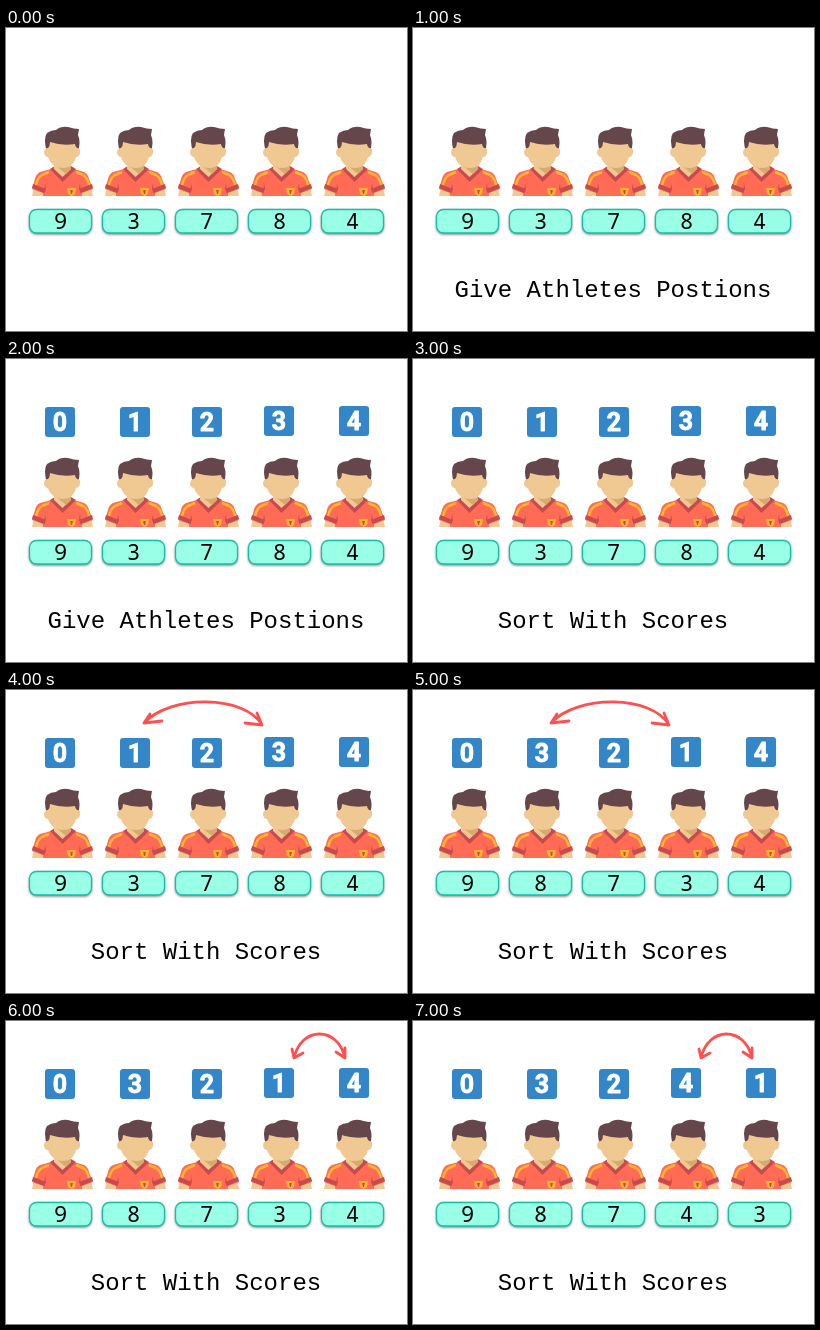
These frames come from a looping animation (401 by 303 pixels, 8 s). An HTML page:

```html
<!DOCTYPE html>
<html lang="en">
<head>
<meta charset="utf-8">
<style>
  html, body { margin: 0; width: 100%; height: 100%; overflow: hidden; background: #fff; }
  svg { display: block; width: 401px; height: 303px; }
  text { text-anchor: middle; }
  .title { font: 24px "Courier New", "Liberation Mono", monospace; }
  .score { font: 22px "Noto Sans Mono", monospace; }
  .rank { font: 700 25px Roboto, sans-serif; fill: #fff; stroke: #fff; stroke-width: .8; stroke-linejoin: round; }
  .box { fill: #99ffe6; stroke: #16c0a6; stroke-width: 1.3; filter: drop-shadow(0 1.5px 1.3px #0007); }
  .arrow { fill: none; stroke: #ff5050; stroke-width: 2.8; stroke-linecap: round; stroke-linejoin: round; }
</style>
</head>
<body>
<svg viewBox="0 0 401 303">
  <defs>
    <g id="athlete">
      <path fill="#f0c891" d="M2 60L13 63V69H0ZM59 60L48 63V69H61Z"/>
      <path fill="#ff6b55" d="M19 42L8 45Q4 47 3 52L0 62L11 66V69H50V66L61 62L57 52Q56 47 52 45L42 42Z"/>
      <path fill="none" stroke="#ffb62e" stroke-width="2.5" d="M17 45L10 48Q6 50 4 58M44 45L51 48Q55 50 57 58"/>
      <path fill="#c64b4e" d="M1 57L14 62L12 66L0 61ZM60 57L47 62L49 66L61 61ZM13 56L14 62L12 67ZM48 56L47 62L49 67Z"/>
      <path fill="#c64b4e" d="M18 42L30.5 55L44 42L39 39H23Z"/>
      <path fill="#f0c891" d="M22 36H39V42L30.5 50L22 42Z"/>
      <path fill="#d7aa70" d="M23 38H39V42L34 47Z"/>
      <path fill="#ffb62e" d="M35 61H44L43 67L40 69L36 67Z"/>
      <path fill="#c64b4e" d="M38 63H41L40 67H39Z"/>
      <path fill="#65464a" d="M15 26Q11 11 15 6Q19 3 24 3Q29 -1 36 0Q42 2 47 2L46 8Q49 15 46 25Z"/>
      <path fill="#f0c891" d="M16 21Q18 19 18 15Q30 19 43 17Q43 19 45 21Q49 21 48 26Q47 30 44 30Q42 37 37 40Q31 42 25 40Q18 37 16 30Q13 30 12 26Q12 21 16 21Z"/>
    </g>
  </defs>
  <g id="row"></g>
  <g class="arrow">
    <path id="wide" d="M138 33C165 4 239 5 256 35M144 24L138 33L156 31M251 23L256 35L239 33"/>
    <path id="narrow" d="M288 37C295 5 332 5 339 37M286 28L288 37L297 32M339 27L339 37L330 31"/>
  </g>
  <text id="title" class="title" x="200" y="269"></text>
</svg>
<script>
const byId = id => document.getElementById(id);
const badgeX = [54, 129, 201, 273, 348];
const scores = [9, 3, 7, 8, 4];

byId('row').innerHTML = badgeX.map((x, i) => {
  const left = 23 + 73 * i, top = i < 3 ? 48 : 47;
  return `<use href="#athlete" x="${left + 3}" y="99"/>
    <rect class="box" x="${left + .5}" y="181.5" width="62" height="23.5" rx="7"/>
    <text class="score" x="${left + 31.5}" y="201"></text>
    <g class="badge">
      <rect x="${x - 15}" y="${top}" width="30" height="30" rx="3" fill="#3387c8"/>
      <text class="rank" x="${x}" y="${top + 24}"></text>
    </g>`;
}).join('');

const scoreTexts = document.querySelectorAll('.score');
const rankTexts = document.querySelectorAll('.rank');
const badges = document.querySelectorAll('.badge');
const show = (el, on) => el.setAttribute('visibility', on ? 'visible' : 'hidden');

function draw(step) {
  const order = step < 5 ? [0, 1, 2, 3, 4] : step < 7 ? [0, 3, 2, 1, 4] : [0, 3, 2, 4, 1];
  order.forEach((athlete, i) => {
    scoreTexts[i].textContent = scores[athlete];
    rankTexts[i].textContent = athlete;
    show(badges[i], step >= 2);
  });
  byId('title').textContent = step < 1 ? '' : step < 3 ? 'Give Athletes Postions' : 'Sort With Scores';
  show(byId('wide'), step === 4 || step === 5);
  show(byId('narrow'), step >= 6);
}

let shown = -1;
function tick() {
  const step = Math.floor(performance.now() % 8000 / 1000);
  if (step !== shown) draw(shown = step);
  requestAnimationFrame(tick);
}
tick();
</script>
</body>
</html>
```
